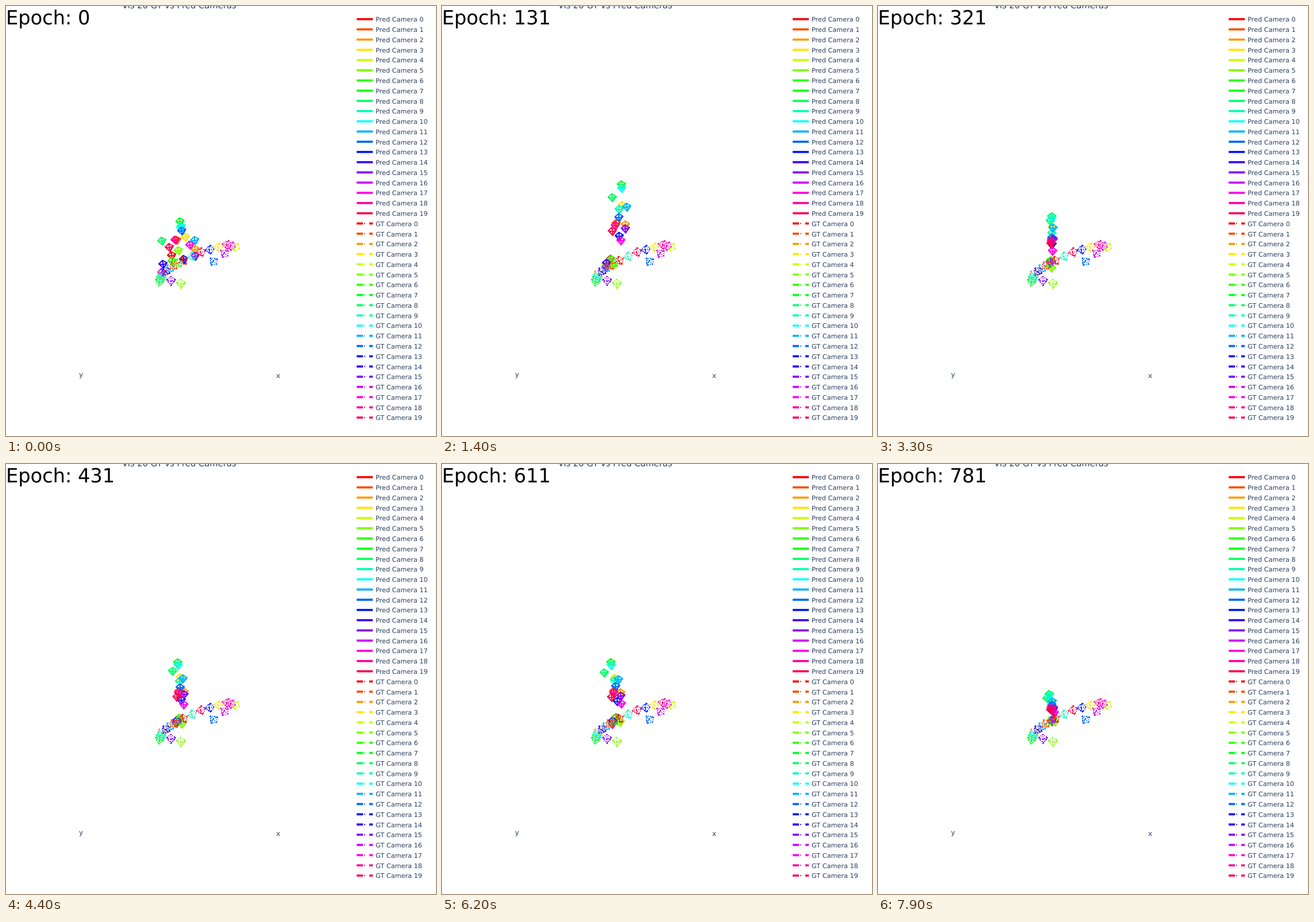
Write a matplotlib script that moves like this. It is 748 px wide and 748 px high and loops after 8 s.

```python
import colorsys

import matplotlib.pyplot as plt
import numpy as np
from matplotlib.animation import FuncAnimation
from matplotlib.collections import LineCollection

SIZE, DPI = 748, 100
FRAMES, STEP_MS = 80, 100
N = 20
PX = 72 / DPI
INK = "#2a3f5f"
COLORS = [colorsys.hsv_to_rgb(i / N, 1, 1) for i in range(N)]

plt.rcParams["font.family"] = "DejaVu Sans"
plt.rcParams["text.hinting"] = "none"
fig = plt.figure(figsize=(SIZE / DPI, SIZE / DPI), dpi=DPI, facecolor="white")
ax = fig.add_axes([0, 0, 1, 1])
ax.set_xlim(0, SIZE)
ax.set_ylim(SIZE, 0)
ax.axis("off")

# Wireframe frustum: a rhombus base on top, the apex at the bottom.
L, T, R, F, A = (-7, -1.6), (0, -6.8), (7, -1.6), (0, 0.9), (0, 7)
FRUSTUM = np.array([L, T, R, F, L, A, R, A, T])


def frustum(x, y, deg=0, scale=1):
    a = np.radians(deg)
    rot = np.array([[np.cos(a), np.sin(a)], [-np.sin(a), np.cos(a)]])
    return scale * FRUSTUM @ rot + (x, y)


def label(x, y, s, px, color=INK, **kw):
    return ax.text(x, y, s, fontsize=px * PX, color=color, **kw)


# Predicted cameras sit on a trunk that stretches, leans and settles;
# each has its own height on it and a seeded offset.
FOOT = 446
HEIGHT = np.array([0, 38, 42, 60, 5, -12, 3, 78, 73, 48,
                   77, 60, 40, 33, 0, 41, 0, 18, 35, 32])
OFFSET = np.clip(np.random.default_rng(4).normal(size=(2, N)), -1.6, 1.6)

TIMES = [0, 7, 22, 33, 55, 70, 79]
STRETCH = [0.7, 2.1, 1.1, 1, 1.45, 0.93, 0.55]
LEAN = [0, 0.1, 0.08, 0, -0.15, -0.17, -0.2]
TRUNK_X = [300, 300, 298, 302, 308, 307, 306]
SPREAD = [18, 13, 3.5, 1.5, 9, 5, 2.5]
TILT = [-9, -7, -2, 0, 0, -7, -8]


def pred_cameras(n):
    stretch, lean, foot_x, spread, tilt = (
        np.interp(n, TIMES, k) for k in (STRETCH, LEAN, TRUNK_X, SPREAD, TILT))
    rise = HEIGHT * stretch
    x = foot_x + lean * rise + spread * OFFSET[0]
    y = FOOT - rise + spread * OFFSET[1]
    return [frustum(cx, cy, tilt) for cx, cy in zip(x, y)]


# Ground-truth cameras follow one curved path, turning as they go;
# four more stand below it.
ORDER = [7, 8, 10, 2, 14, 11, 1, 6, 0, 9, 19, 13, 3, 18, 17, 4]
PATH_K = [0, 3, 6, 8, 10, 13, 15]
PATH_X = [267, 271, 291, 308, 339, 384, 399]
PATH_Y = [479, 467, 452, 443, 428, 415, 419]
BELOW = {5: (304, 483, 0), 15: (287, 478, 0),
         12: (361, 444, 135), 16: (380, 430, 130)}


def truth_cameras():
    place = dict(BELOW)
    for k, i in enumerate(ORDER):
        place[i] = (np.interp(k, PATH_K, PATH_X),
                    np.interp(k, PATH_K, PATH_Y), 10 + 7 * k)
    return [frustum(*place[i], scale=1.12) for i in range(N)]


pred = LineCollection([], colors=COLORS, linewidths=2 * PX, zorder=2)
truth = LineCollection(truth_cameras(), colors=COLORS, linewidths=1.8 * PX,
                       linestyles=[(0, (1.6, 1, 0.8, 1))], zorder=3)
ax.add_collection(pred, autolim=False)
ax.add_collection(truth, autolim=False)


def legend_line(x0, x1, y, color, width=3.7):
    ax.plot([x0, x1], [y, y], color=color, lw=width * PX,
            solid_capstyle="butt", snap=False)


for row in range(2 * N):
    i, y = row % N, 22.9 + 17.77 * row
    c = COLORS[i]
    if row < N:
        legend_line(610, 638, y, c)
    else:
        legend_line(610, 621, y, c)
        legend_line(623, 625, y, c, 1.8)
        legend_line(632, 638, y, c)
    kind = "Pred" if row < N else "GT"
    label(642.7, y + 4.3, f"{kind} Camera {i}", 11.3)

label(202, 4, "Vis 20 GT vs Pred Cameras", 14.8)
label(130, 645, "y", 12, ha="center")
label(473, 647, "x", 12, ha="center")
epoch = label(0, 32, "", 33.7, "black")


def draw(n):
    epoch.set_text(f"Epoch: {max(0, 10 * n - 9)}")
    pred.set_segments(pred_cameras(n))
    return pred, epoch


anim = FuncAnimation(fig, draw, frames=FRAMES, interval=STEP_MS,
                     repeat=True, repeat_delay=0)
plt.show()
```
